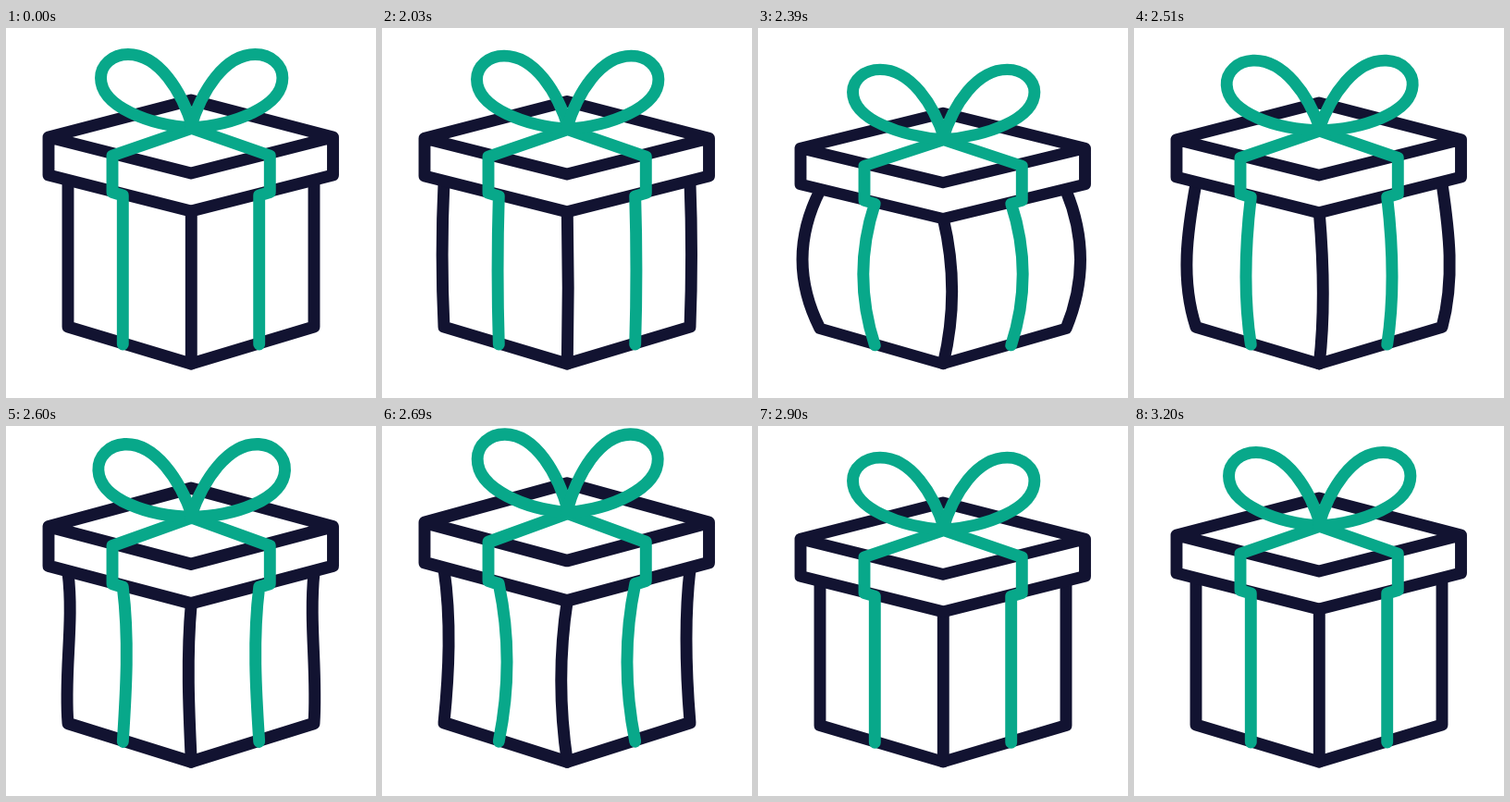
Write an HTML page that moves like this. It is 400 px wide and 400 px high and loops after 3230 ms.

```html
<!DOCTYPE html>
<html lang="en">
<head>
<meta charset="utf-8">
<title>Gift box</title>
<style>
  html, body { margin: 0; width: 100%; height: 100%; overflow: hidden; background: #fff; }
  svg { display: block; width: 100%; height: 100%; }
  path { fill: none; stroke: #121331; stroke-width: 12.9; stroke-linecap: round; stroke-linejoin: round; }
  .ribbon path { stroke: #08a88a; }
</style>
</head>
<body>
<svg viewBox="0 0 400 400">
  <g id="gift">
    <path id="body"/>
    <path id="spine"/>
    <path d="M46 118 200 78 353.5 118 200 157ZV159L200 198 353.5 159V118"/>
    <g class="ribbon">
      <path id="straps"/>
      <path class="loop" d="M202 108C190 68 165 28.5 132 28.5C115 28.5 102.5 40 102.5 54C102.5 85 155 105 202 108"/>
      <g transform="translate(401.4 0) scale(-1 1)">
        <path class="loop" d="M202 108C190 68 165 28.5 132 28.5C115 28.5 102.5 40 102.5 54C102.5 85 155 105 202 108"/>
      </g>
    </g>
  </g>
</svg>
<script>
const LOOP = 3230, STEP = 30, BASE = 363;
const START = 2000, PRESSED = 2390, STRAIGHT = 2900;

const gift = document.getElementById('gift');
const loops = document.querySelectorAll('.loop');
const setPath = (id, d) => document.getElementById(id).setAttribute('d', d);

const ramp = (t, a, b) => Math.min(1, Math.max(0, (t - a) / (b - a)));
const press = t => 1 - (1 - ramp(t, START, PRESSED)) ** 1.3;
const swing = (t, a, b) => (1 - Math.cos(Math.PI * ramp(t, a, b))) / 2;

// Squash, then half swings that get shorter and weaker
function stretch(t) {
  let from = -.049, to = .056, at = PRESSED, span = 290;
  if (t < at) return from * press(t);
  while (t > at + span && span > 100) {
    at += span;
    span *= .76;
    [from, to] = [to, -.3 * to];
  }
  return span > 100 ? from + (to - from) * swing(t, at, at + span) : 0;
}

// Bulge out, pinch in until the peak, straighten again
const bend = (t, out, pinch, peak) =>
  out * press(t) - (out + pinch) * swing(t, PRESSED, peak) + pinch * swing(t, peak, STRAIGHT);

// One full wag of the bow
const tilt = t => -3.4 * Math.sin(2 * Math.PI * ramp(t, 2450, STRAIGHT));

// Vertical edge whose handles are pushed sideways
function edge(x, y0, y1, push0, push1) {
  const third = (y1 - y0) / 3;
  return `L${x} ${y0}C${x + push0} ${y0 + third} ${x + push1} ${y1 - third} ${x} ${y1}`;
}

function draw(t) {
  const scale = 1 + stretch(t);
  const sideHi = bend(t, 23, 8, 2640), sideLo = bend(t, 23, 7, 2750);
  const midHi = bend(t, 16.7, 12, 2680), midLo = bend(t, 16.7, 12, 2720);

  gift.setAttribute('transform', `translate(0 ${BASE * (1 - scale)}) scale(1 ${scale})`);
  loops.forEach(l => l.setAttribute('transform', `rotate(${tilt(t)} 202 108)`));

  setPath('body', 'M67 166' + edge(67, 166, 323, -1.1 * sideHi, -1.1 * sideLo) +
    'L200 363' + edge(333, 323, 166, .9 * sideLo, .9 * sideHi));
  setPath('spine', 'M200.3 198' + edge(200.3, 198, 363, .75 * midHi, .75 * midLo));
  setPath('straps', 'M126.3 342' + edge(126.3, 342, 181, -midLo, -midHi) +
    'L115 177.5V138L200.7 108.5 285.3 138V177.5' + edge(273.7, 181, 342, midHi, midLo));
}

const origin = performance.now();
function tick() {
  const t = (performance.now() - origin) % LOOP;
  draw(START + Math.floor((t - START) / STEP) * STEP);
  requestAnimationFrame(tick);
}
tick();
</script>
</body>
</html>
```
